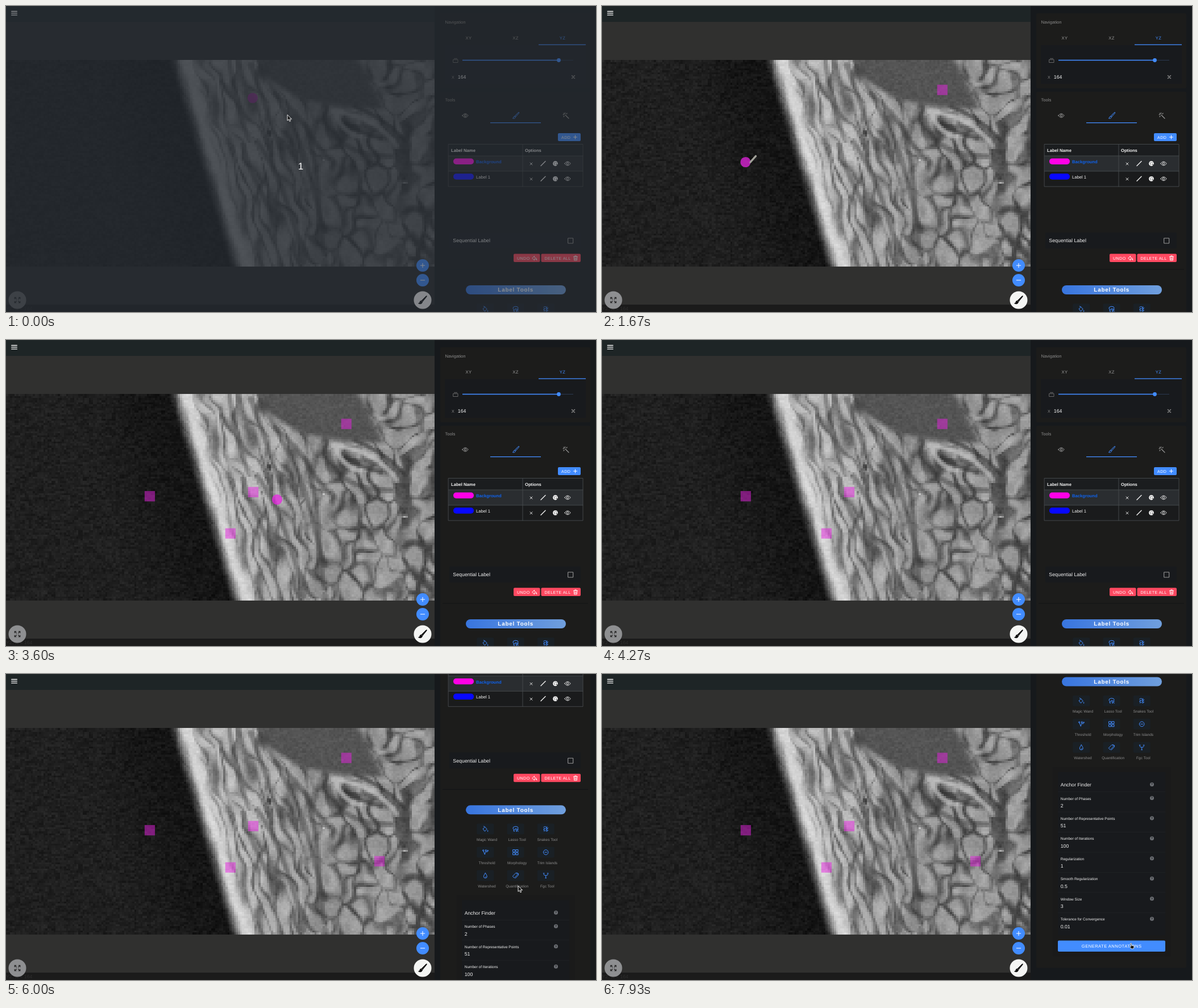
An HTML page with a canvas that plays this animation: 1038x539 px, repeating every 8 s.

```html
<!DOCTYPE html>
<html lang="en">
<head>
<meta charset="utf-8">
<title>Label painting</title>
<style>
  html, body { margin: 0; width: 100%; height: 100%; overflow: hidden; background: #30302f; }
  canvas, svg { position: absolute; left: 0; top: 0; }
  canvas { top: 95px; width: 753.5px; height: 364px; image-rendering: pixelated; }
  svg { width: 1038px; height: 539px; }
  text { font-family: "Liberation Sans", Arial, sans-serif; text-rendering: geometricPrecision; white-space: pre; }
</style>
</head>
<body>
<canvas id="scan" width="207" height="100"></canvas>
<svg id="stage" viewBox="0 0 1038 539"></svg>
<script>
const CELL = 3.64, BLUE = '#428cff', RED = '#ff4961', MAGENTA = '#ff00e6', PAINT = '#e824e2';
const $ = id => document.getElementById(id);
const mix = (a, b, k) => a + (b - a) * k;
const smooth = (a, b, x) => {
  const k = Math.min(1, Math.max(0, (x - a) / (b - a)));
  return k * k * (3 - 2 * k);
};

// ---- scan ----
const hash = (a, b) => {
  const s = Math.sin(a * 127.1 + b * 311.7) * 43758.5453;
  return s - Math.floor(s);
};

// Smooth noise around zero, from -.5 to .5.
function cloud(u, v) {
  const i = Math.floor(u), j = Math.floor(v), k = smooth(0, 1, u - i);
  return mix(mix(hash(i, j), hash(i + 1, j), k), mix(hash(i, j + 1), hash(i + 1, j + 1), k), smooth(0, 1, v - j)) - .5;
}

// Distance to the nearest cell wall: 0 on the wall, larger inside the cell.
function wall(u, v) {
  const cu = Math.floor(u), cv = Math.floor(v);
  let near = 9, next = 9;
  for (let i = cu - 1; i <= cu + 1; i++)
    for (let j = cv - 1; j <= cv + 1; j++) {
      const d = Math.hypot(i + hash(i, j) - u, j + hash(j + 57, i) - v);
      if (d < near) { next = near; near = d; }
      else if (d < next) next = d;
    }
  return next - near;
}

function tissue(x, y) {
  const skin = x - 297 - (y - 95) * .3;
  const noise = mix(hash(x, y), hash(Math.floor(x / 8), y), .5) - .5;
  const air = 31 + noise * 22 - 10 * smooth(-190, -30, skin);
  if (skin < -20) return air;

  const right = 620 + (y - 95) * .5;
  const wx = x + 26 * cloud(x / 28, y / 34), wy = y + 30 * cloud(x / 30 + 40, y / 30);
  const long = wall((wx - y * .32) / 20, wy / 110);
  const round = wall((wx - y * .15) / 31, wy / 46);
  const slanted = wall((wx * .6 + wy) / 30, (wx - wy) / 80);
  let cells = mix(long, round, smooth(470, 620, x));
  cells = mix(cells, slanted, smooth(right, right + 30, x) * smooth(245, 215, y));
  cells += .4 * cloud(x / 16, y / 36 + 9) + .06;
  let v = 76 + 78 * smooth(-.02, .48, cells) + 30 * smooth(560, 400, x) + 32 * cloud(x / 12, y / 20);
  const line = 16 + 14 * cloud(3, y / 60);
  v = mix(v, 218, .9 * Math.exp(-(((skin - line) / 15) ** 2)));

  const floor = 95 + 88 * (1 - Math.exp(-(x - 440) / 55));
  const muscle = smooth(floor + 8, floor - 8, y) * smooth(right + 14, right - 10, x);
  v = mix(v, 84, muscle) + noise * 20;
  return mix(air, v, smooth(-14, 14, skin));
}

function drawScan() {
  const g = $('scan').getContext('2d');
  const img = g.createImageData(207, 100);
  for (let i = 0; i < 20700; i++) {
    const v = tissue((i % 207 + .5) * CELL, 95 + (Math.floor(i / 207) + .5) * CELL);
    img.data.set([v, v, v, 255], i * 4);
  }
  g.putImageData(img, 0, 0);
  g.scale(1 / CELL, 1 / CELL);
  g.translate(0, -95);
  // A wide and a narrow pass give soft edges.
  const stroke = (color, width, ...paths) => {
    g.strokeStyle = color;
    for (const w of [width * 1.7, width]) {
      g.lineWidth = w;
      paths.forEach(p => g.stroke(new Path2D(p)));
    }
  };
  stroke('rgba(55,55,55,.25)', 6,
    'M392 95Q398 140 412 190T428 235', 'M428 100Q445 140 462 195T485 255',
    'M445 105Q475 155 500 205T535 300T560 400', 'M470 150Q515 190 535 225T570 272',
    'M415 240Q428 290 446 322T472 390', 'M440 235Q475 290 492 340T525 455',
    'M525 205Q545 260 549 330T560 440', 'M566 195Q575 235 605 250T680 265');
  stroke('rgba(200,200,200,.42)', 6, 'M572 185Q625 190 655 214T688 250', 'M580 190Q592 225 625 232');
  stroke('rgba(50,50,50,.35)', 5, 'M610 176Q665 195 704 240', 'M594 203Q620 224 662 234');
  g.fillStyle = 'rgba(240,240,240,.7)';
  g.fillRect(557, 269, 4, 4);
  g.fillRect(697, 309, 8, 4);
  g.fillStyle = 'rgba(25,25,25,.7)';
  g.fillRect(459, 219, 8, 9);
}

// ---- interface ----
const rect = (x, y, w, h, fill, r = 0, more = '') =>
  `<rect x="${x}" y="${y}" width="${w}" height="${h}" fill="${fill}" rx="${r}" ${more}/>`;
const disc = (x, y, r, fill) => `<circle cx="${x}" cy="${y}" r="${r}" fill="${fill}"/>`;
const text = (x, y, s, size, fill = '#f2f2f2', more = '') =>
  `<text x="${x}" y="${y + size * .36}" font-size="${size}" fill="${fill}" ${more}>${s}</text>`;
const icon = (x, y, d, color = '#ddd', w = 1, fill = 'none') =>
  `<path transform="translate(${x} ${y})" d="${d}" fill="${fill}" stroke="${color}" stroke-width="${w}" stroke-linecap="round" stroke-linejoin="round"/>`;
const MID = ' text-anchor="middle"', BOLD = ' font-weight="bold"', CAPS = ' letter-spacing=".43"';

const EYE = 'M-5.2 0Q0 -7 5.2 0Q0 7 -5.2 0ZM-1.8 0a1.8 1.8 0 1 0 3.6 0a1.8 1.8 0 1 0-3.6 0';
const PLUS = 'M-3 0H3M0 -3V3', CROSS = 'M-2 -2L2 2M2 -2L-2 2';
const BRUSH = 'M-1.5 .5L4.2 -5.4Q6.4 -6.6 5.4 -4.2L-.2 2ZM-2 1.2Q-4.6 1.6 -4.2 3.8L-5.6 4.8Q-1.5 6.3 -.6 2.6Z';
const FIELDS = [['Number of Phases', 2], ['Number of Representative Points', 51], ['Number of Iterations', 100],
  ['Regularization', 1], ['Smooth Regularization', .5], ['Window Size', 3], ['Tolerance for Convergence', .01]];
const TOOLS = [
  ['Magic Wand', 'M-4 -.5L-.5 -3.5L3 .5L-.8 3.8ZM-3 -4.8L-.5 -3.5M4.3 2.5V4.5'],
  ['Lasso Tool', 'M-1.5 3.8H-3.5L-3 1.5Q-5.5 -1 -4 -3.2Q-1 -5.5 3.5 -3.8Q5.5 -2 4 0M-3 1.5Q-1 2 -1 0M.5 -.5L4.8 1.2L2.8 2.2L2 4.4ZM3 2.4L4.8 4.4'],
  ['Snakes Tool', 'M-4 -3Q0 -6 1 -2T4 -2M-4 1Q-1 -3 1 1T4 2M-3 4Q-1 1 1 4M-3 -1V3M2 -4V4'],
  ['Threshold', 'M-4.8 -3.2a1.2 1.2 0 1 0 2.4 0a1.2 1.2 0 1 0-2.4 0M-3.2 -2L-1 4L1 -2.8L2.4 0L4 -2M0 -3.5a1 1 0 1 0 2 0a1 1 0 1 0-2 0M3.4 -2.8a.9 .9 0 1 0 1.8 0a.9 .9 0 1 0-1.8 0'],
  ['Morphology', 'M-4.5 -4.5H-.8V-.8H-4.5ZM.8 -4.5H4.5V-.8H.8ZM-4.5 .8H-.8V4.5H-4.5ZM.8 .8H4.5V4.5H.8Z'],
  ['Trim Islands', 'M-4.3 0a4.3 4.3 0 1 0 8.6 0a4.3 4.3 0 1 0-8.6 0M-2 0H2'],
  ['Watershed', 'M0 -4.5Q-3 0 -3 1.5A3 3 0 0 0 3 1.5Q3 0 0 -4.5M1.4 2Q1 3 0 3'],
  ['Quantification', 'M-5 1L.5 -4.5H3.5V-1.5L-2 4ZM2 -3h.1M-.5 4.8L5 -.8V-3.5'],
  ['Fgc Tool', 'M-3.5 -3.2V-2Q-3.5 0 0 0Q3.5 0 3.5 -2V-3.2M0 0V3.6M-4.4 -4h1.8M2.6 -4h1.8M-.9 4.4h1.8']];

function labelRow(y, color, name, nameStyle) {
  return rect(787, y - 9, 36, 10.5, color, 5) + text(827, y - 3, name, 7.65, ...nameStyle)
    + icon(924, y + .5, CROSS) + icon(945, y, 'M-4 4L4 -4', '#eee', 1.4)
    + disc(966.5, y, 4.4, '#f2f2f2') + icon(966.5, y, 'M-2 -.6h.1M-.4 -2.3h.1M1.9 -1.4h.1M-1.2 1.6h.1M3.8 2.8L1.8 1.4', '#1c1c1c', 1.1)
    + icon(988, y, EYE);
}

function help(y) {
  return disc(967.5, y, 3.5, '#6d7075') + text(967.5, y, '?', 5.5, '#181a1d', MID + BOLD);
}

function panel() {
  return rect(754, 0, 284, 1100, '#16191c')
    + rect(764, 13, 264, 132, '#1c1c1b', 2) + rect(772, 69, 248, 68, '#181a1d')
    + text(772.5, 28, 'Navigation', 7.65, '#8c8c8c')
    + text(814, 56, 'XY', 7.65, '#999', MID + CAPS) + text(896.5, 56, 'XZ', 7.65, '#999', MID + CAPS)
    + text(979, 56, 'YZ', 7.65, BLUE, MID + CAPS) + rect(937, 67.5, 83, 1.3, BLUE)
    + icon(791, 96, 'M-4 -1.5H4V3.5H-4ZM-2.5 -3.5H2.5', '#686868')
    + rect(803, 95, 195, 1, '#2b3850') + rect(803, 94.7, 169, 1.6, BLUE) + disc(972.5, 95.5, 3.4, BLUE)
    + text(784, 125, 'X', 7.1, '#888') + text(794.8, 125, '164', 8.75) + icon(998, 125, 'M-2.5 -2.5L2.5 2.5M2.5 -2.5L-2.5 2.5', '#858585', 1.5)
    + rect(764, 151, 264, 853, '#1c1c1b', 2) + text(772.5, 165, 'Tools', 7.65, '#8c8c8c')
    + icon(808, 193, EYE, '#999') + icon(897, 193, BRUSH, BLUE)
    + icon(985, 193, 'M-1 -1L5 5M-1.5 -5V-3.5M-5 -1.5H-3.5M-4 -4L-3 -3M2 -4L1 -3M-4 2L-3 1', '#999', 1.2)
    + rect(852, 205, 89, 1.3, BLUE)
    + rect(971, 224, 40, 14, BLUE, 2) + text(977, 231, 'ADD', 7.1, '#fff', CAPS) + icon(1001.5, 231, PLUS, '#fff')
    + rect(778.5, 243.5, 236.5, 20.5, '#1b1d1f') + rect(778.5, 264, 236.5, 27, '#2a2d30') + rect(778.5, 291, 236.5, 27, '#1a1b1c')
    + icon(778.5, 243.5, 'M0 0H236.5V74.5H0ZM0 20.5H236.5M0 47.5H236.5M130.5 0V74.5', '#484c50', .9)
    + text(783, 254, 'Label Name', 7.65, '#f2f2f2', BOLD) + text(913, 254, 'Options', 7.65, '#f2f2f2', BOLD)
    + labelRow(277.5, MAGENTA, 'Background', ['#0f62ec', BOLD]) + labelRow(304.3, '#0808ff', 'Label 1', ['#f2f2f2'])
    + rect(780, 399, 231, 28, '#181a1d') + text(786.3, 413.3, 'Sequential Label', 8.82)
    + rect(988.7, 409, 9, 9, 'none', .5, 'stroke="#999" stroke-width="1.1"')
    + rect(893, 436.5, 46.5, 14.5, RED, 2) + text(899, 444, 'UNDO', 7.1, '#fff', CAPS)
    + icon(930, 444, 'M-4 0L-.5 -3.5V-1.5Q3.5 -1 4 3.5Q2 1.2 -.5 1.5V3.5Z', '#fff', .9)
    + rect(941.5, 436.5, 69.5, 14.5, RED, 2) + text(947.5, 444, 'DELETE ALL', 7.1, '#fff', CAPS)
    + icon(1002, 444, 'M-3.5 -2.5H3.5M-1.2 -2.5V-4H1.2V-2.5M-2.8 -2.5L-2.3 4H2.3L2.8 -2.5M-.9 -.5V2.5M.9 -.5V2.5', '#fff', .9)
    + rect(768, 463.5, 256, 1, '#131416')
    + rect(809, 492, 176, 16, 'url(#pill)', 8) + text(896.7, 499.7, 'Label Tools', 9.85, '#fff', MID + BOLD + ' letter-spacing=".8"')
    + TOOLS.map(([name, d], i) => {
        const x = 843.3 + i % 3 * 53.2, y = 533.7 + Math.floor(i / 3) * 41;
        return rect(x - 15, y - 9.5, 30, 19, '#1a2025', 2) + icon(x, y, d, BLUE)
          + text(x + 2.7, y + 18.2, name, 6.55, '#8c8c8c', MID);
      }).join('')
    + rect(793, 650, 208, 334, '#1a1a1a') + rect(802, 659, 189, 288, '#181a1d')
    + text(806.7, 681.3, 'Anchor Finder', 8.65) + help(681)
    + FIELDS.map(([name, value], i) => {
        const y = 705.7 + i * 35.45;
        return rect(802, y - 12, 189, .7, '#222426') + text(806.7, y, name, 6.5) + help(y - .7) + text(806.7, y + 12.5, value, 8.75);
      }).join('')
    + rect(802, 956, 189, 19.5, BLUE, 2) + text(896.7, 965.8, 'GENERATE ANNOTATIONS', 7.65, '#fff', MID + CAPS);
}

// Painted cells: column, row, time of appearance.
const DABS = [[162, 12, 870], [67, 47, 1730], [106, 65, 2600], [117, 45, 3470], [178, 62, 5470]];

function build() {
  $('stage').innerHTML = `<defs>
      <linearGradient id="pill"><stop stop-color="#3875df"/><stop offset="1" stop-color="#709fdd"/></linearGradient>
      <clipPath id="view"><path d="M0 28H754V526H0Z"/></clipPath></defs>`
    + rect(0, 0, 754, 28, '#1e2526') + rect(0, 526, 754, 13, '#1b1b1b') + text(0, 532.5, 'YZ, X = 164', 8.75, '#2e2e2e')
    + DABS.map(([c, r]) => rect(c * CELL, 95 + r * CELL, 5 * CELL, 5 * CELL, PAINT, 0, 'class="dab" opacity=".5"')).join('')
    + `<g clip-path="url(#view)"><circle id="tip" r="9.1" fill="${PAINT}" opacity=".74"/>
       <g id="brush"><path d="M6 -2L15 -12" stroke-width="3.4" stroke-linecap="round"/><path d="M4 0L7 -1.5" stroke-width="1.8"/></g></g>`
    + `<g id="ui"><g id="panel">${panel()}</g>`
    + icon(14.5, 12.7, 'M-4.8 -3.2H4.8M-4.8 0H4.8M-4.8 3.2H4.8', '#fff', 1.3)
    + disc(733, 457, 11, BLUE) + icon(733, 457, 'M-3.7 0H3.7M0 -3.7V3.7', '#fff')
    + disc(733, 483, 11, BLUE) + icon(733, 483, 'M-3.7 0H3.7', '#fff')
    + disc(733, 518, 15.5, '#f4f5f3') + icon(733, 518, 'M-1.5 .5L6 -7Q8 -8 7 -6L.2 2.4ZM-2.6 1.2Q-5.6 1.6 -5 4.6L-7.4 5.8Q-1.5 8.6 -.4 3.2Z', '#111', 1, '#111')
    + '</g>' + disc(20, 518, 15.5, '#8e8f91')
    + icon(20, 518, 'M-4.8 -2V-4.8H-2M2 -4.8H4.8V-2M4.8 2V4.8H2M-2 4.8H-4.8V2M-4.8 -4.8L-1.5 -1.5M4.8 -4.8L1.5 -1.5M4.8 4.8L1.5 1.5M-4.8 4.8L-1.5 1.5', '#222', 1.1)
    + `<g id="dim">${rect(0, 0, 1038, 539, '#252a31', 0, 'opacity=".77"')}
       <use href="#ui" opacity=".3" style="mix-blend-mode:lighten"/>${text(518.5, 281.5, '1', 17, '#fff', MID)}</g>`
    + `<g id="arrow">${icon(0, 0, 'M0 0V9.8L2.3 7.7L4 11.3L5.7 10.5L4.1 7.1H7.2Z', '#fff', .9, '#1a1a1a')}</g>`
    + `<g id="hand">${icon(0, 0, 'M0 0Q1.4 -1 1.6 .6V3.6L5 4.3Q6.4 4.7 6 6.5L5.2 9.4H1L-1.6 5.8Q-1.6 4.4 .1 5.4Z', '#fff', .8, '#151515')}</g>`;
}

// ---- motion ----
const POINTER = [[0, 434, 162], [100, 434, 162], [130, 501, 190], [250, 501, 190], [330, 597, 147], [840, 597, 147],
  [1330, 252.5, 275], [1670, 252.5, 275], [2400, 394, 341], [2570, 394, 341], [2930, 434.5, 267.5], [3430, 434.5, 267.5],
  [4200, 775, 376], [4340, 766, 376], [5070, 657, 330], [5430, 657, 330], [5870, 901, 373.5], [6470, 901, 373.5],
  [7070, 921, 468], [7230, 921, 468], [7530, 930, 474.5], [8000, 930, 474.5]];
const SCROLL = [[0, 0], [5700, 0], [6000, 260.7], [6200, 260.7], [6670, 486.5], [8000, 486.5]];

function at(keys, t) {
  const i = Math.max(1, keys.findIndex(k => k[0] >= t));
  const a = keys[i - 1], b = keys[i], k = smooth(a[0], b[0], t);
  return a.slice(1).map((v, n) => mix(v, b[n + 1], k));
}
const show = (el, on) => el.style.display = on ? '' : 'none';
const place = (id, x, y) => $(id).setAttribute('transform', `translate(${x} ${y})`);

function render(now) {
  const t = Math.floor(now % 8000 * .015 + .06) / .015;
  const [x, y] = at(POINTER, t), [bx, by] = at(POINTER, Math.min(8000, t + 67));
  const start = t < 60, inPanel = t > 5400 && x > 754;
  place('tip', x, y);
  place('brush', bx, by);
  place('arrow', start ? 495 : x, start ? 192 : y);
  place('hand', x, y);
  place('panel', 0, -at(SCROLL, t)[0]);
  $('brush').setAttribute('stroke', Math.hypot(bx - x, by - y) > 6 ? '#707070' : '#a2a29a');
  show($('dim'), start);
  show($('brush'), t > 460);
  show($('arrow'), start || inPanel && t < 7060);
  show($('hand'), t >= 7060);
  document.querySelectorAll('.dab').forEach((d, i) => show(d, t >= DABS[i][2] - 5));
}

drawScan();
build();
const begin = performance.now();
(function loop() {
  render(performance.now() - begin);
  requestAnimationFrame(loop);
})();
</script>
</body>
</html>
```
